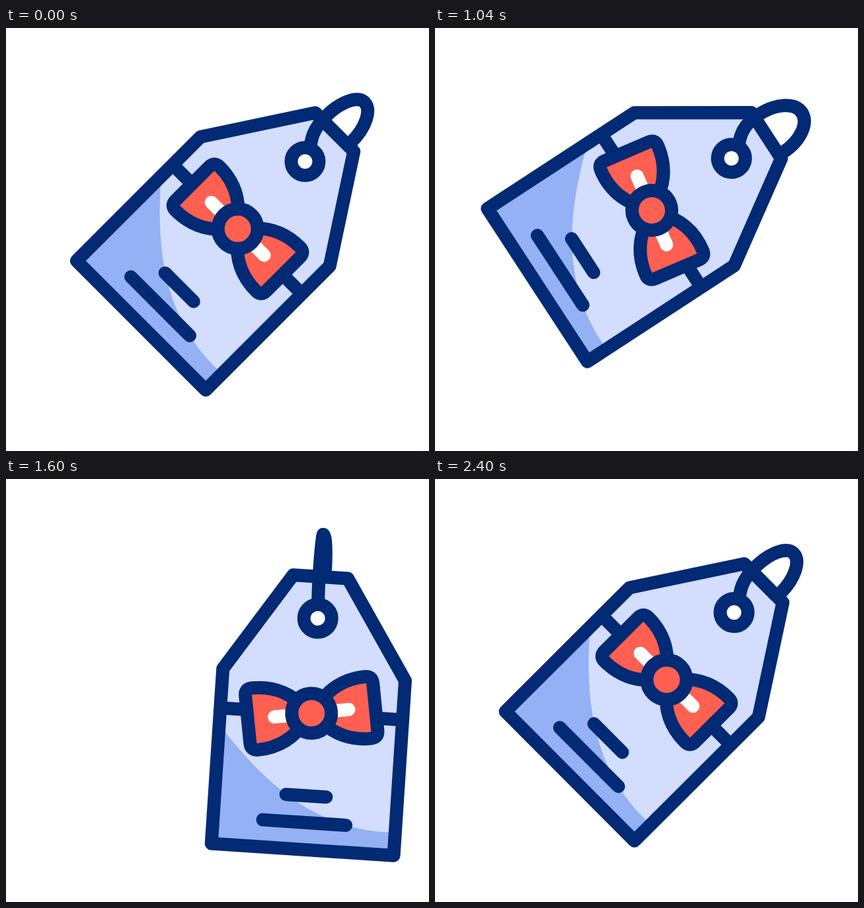
Recreate the animation shown at these times as an HTML page. Size 640x640 px, loop 2420 ms.

```html
<!DOCTYPE html>
<html lang="en">
<head>
<meta charset="utf-8">
<title>Swinging tag</title>
<style>
  html, body { margin: 0; width: 100%; height: 100%; overflow: hidden; background: #fff; }
  svg { display: block; width: 100vw; height: 100vh; }
  .line { stroke: #022a75; stroke-width: 20; stroke-linecap: round; stroke-linejoin: round; }
  .none { fill: none; }
  .red { fill: #ff6051; }
</style>
</head>
<body>
<svg viewBox="0 0 640 640">
  <!-- origin of the tag group is the swing pivot -->
  <g id="tag" fill="none">
    <path id="back" class="line"/>
    <path fill="#d3ddfd" d="M-41.4-33H41.4L138.2 115.5V380.7H-138.2V115.5Z"/>
    <path fill="#93b1f4" d="M-138 199L-131 208C-75 271 10 350 130 346L138 345.5V380H-138Z"/>
    <path class="line" d="M-41.4-33H41.4L138.2 115.5V380.7H-138.2V115.5Z"/>
    <path class="line" d="M-63 339.7H63M-30.5 299H30.5M-135 175H135"/>
    <path id="front" class="line"/>
    <circle class="line" cy="30" r="21" fill="#fff"/>
    <g id="bow">
      <path id="wing" class="line red" d="M-10-10C-32-38-60-47-86-47Q-97-47-97-36V36Q-97 47-86 47C-60 47-32 38-10 10Z"/>
      <use href="#wing" transform="scale(-1 1)"/>
      <path d="M-56.5 0H56.5" stroke="#fff" stroke-width="20" stroke-linecap="round"/>
      <circle class="line red" r="30"/>
    </g>
  </g>
</svg>
<script>
  const LOOP = 2420;
  // time, tag angle, bow angle relative to the tag
  const KEYS = [
    [0, 45, 0],
    [1025, 57, 10],
    [1545, 2, -10],
    [2056, 55, 5],
    [LOOP, 45, 0]
  ];
  const $ = id => document.getElementById(id);
  const tag = $('tag'), bow = $('bow'), back = $('back'), front = $('front');

  function pose(t) {
    const i = KEYS.findIndex(k => k[0] > t);
    const a = KEYS[i - 1], b = KEYS[i];
    const x = (t - a[0]) / (b[0] - a[0]);
    const e = x * x * (3 - 2 * x);
    return [1, 2].map(n => a[n] + (b[n] - a[n]) * e);
  }

  // quarter arch of the string, from its side up to the tip
  const arch = w => `M${w}-40C${w}-72 ${0.55 * w}-97 0-97`;

  function draw(t) {
    const [angle, tilt] = pose(t);
    const l = -0.58 * angle, r = 4.5 + 0.54 * angle;
    tag.setAttribute('transform', `translate(473.7 180.8) rotate(${angle})`);
    bow.setAttribute('transform', `translate(0 174) rotate(${tilt})`);
    back.setAttribute('d', `${arch(r)}M${r}-40V-33`);
    front.setAttribute('d', `${arch(l)}M${l}-40C${l}-14 ${0.7 * l} 0 ${0.25 * l} 12`);
  }

  const start = performance.now();
  function tick() {
    draw((performance.now() - start) % LOOP);
    requestAnimationFrame(tick);
  }
  tick();
</script>
</body>
</html>
```
